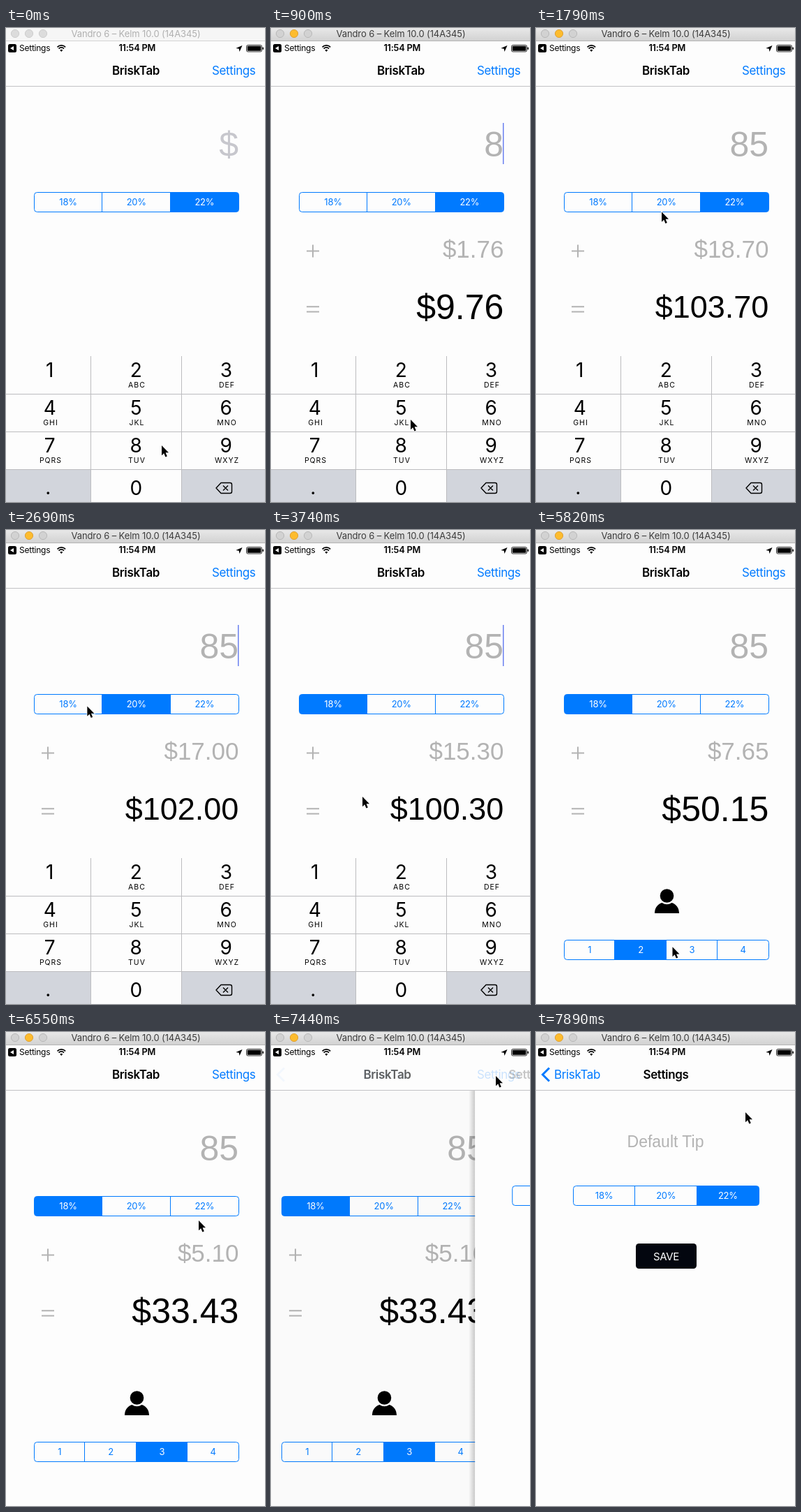
An HTML page that plays this animation: 371 by 679 pixels, repeating every 8 s.

```html
<!DOCTYPE html>
<html lang="en">
<head>
<meta charset="utf-8">
<title>Tip calculator</title>
<style>
html, body { margin: 0; width: 100%; height: 100%; overflow: hidden; background: #fdfdfd; }
svg { display: block; width: 371px; height: 679px; }
text { font-family: Inter, sans-serif; letter-spacing: -.02em; }
.num { font-family: "Liberation Sans", Arial, sans-serif; letter-spacing: 0; }
.key { letter-spacing: 1px; }
</style>
</head>
<body>
<svg id="stage" viewBox="0 0 371 679"></svg>
<script>
const LOOP = 8000, BLUE = '#007aff', GREY = '#b3b3b3', PAPER = '#fdfdfd', APP = 'BriskTab';
const stage = document.getElementById('stage');

const runs = [[0, 300, 2], [600, 1640, 8], [1790, 1790, 1], [2090, 2990, 7], [3140, 3740, 5],
  [4040, 4930, 7], [5230, 6260, 8], [6410, 7000, 5], [7290, 7890, 5]];
const ticks = runs.flatMap(([a, b, n]) =>
  Array.from({ length: n }, (_, i) => n > 1 ? Math.floor((a + (b - a) * i / (n - 1)) / 10) * 10 : a));

// Pointer path: time, x, y
const path = [[450, 223, 598], [750, 200, 561], [1050, 200, 561], [1640, 188, 309], [1790, 180, 263.5],
  [2090, 186, 253], [2390, 186, 251], [2840, 92, 253], [3140, 92, 253], [3740, 131, 382],
  [4340, 131, 382], [4930, 138, 592], [5230, 150, 598], [5520, 150, 598], [5900, 203, 597],
  [6260, 203, 597], [6550, 276, 270], [6850, 322, 63], [7590, 322, 63], [7890, 300, 115]];

function pointer(t) {
  const i = path.findIndex(p => p[0] > t);
  if (i === 0) return path[0].slice(1);
  if (i < 0) return path[path.length - 1].slice(1);
  const [a, x, y] = path[i - 1], [b, u, v] = path[i];
  const k = (t - a) / (b - a), e = k * k * (3 - 2 * k);
  return [x + (u - x) * e, y + (v - y) * e];
}

function spring(ms) {
  const k = Math.max(0, ms) * .01826;
  return 1 - (1 + k) * Math.exp(-k);
}

const text = (s, x, y, size, fill = '#000', anchor = 'middle', more = '') =>
  `<text x="${x}" y="${y}" font-size="${size}" fill="${fill}" text-anchor="${anchor}" ${more}>${s}</text>`;
const num = (s, x, y, size, fill, anchor = 'end') => text(s, x, y, size, fill, anchor, 'class="num"');
const rect = (x, y, w, h, fill, more = '') =>
  `<rect x="${x}" y="${y}" width="${w}" height="${h}" fill="${fill}" ${more}/>`;
const line = (d, stroke, w = 1, more = '') =>
  `<path d="${d}" fill="none" stroke="${stroke}" stroke-width="${w}" ${more}/>`;
const group = (s, x, y, opacity = 1) => `<g transform="translate(${x} ${y})" opacity="${opacity}">${s}</g>`;
const bold = 'font-weight="600"';

function segments(labels, on, x, y, w) {
  const n = labels.length, step = w / n;
  const edge = i => i === 0 ? x : i === n ? x + w : Math.floor(x - .8 + i * step) + .5;
  const left = edge(on), right = edge(on + 1);
  const l = on === 0 ? 4 : 0, r = on === n - 1 ? 4 : 0;
  let s = `<path fill="${BLUE}" d="M${left + l} ${y}H${right - r}q${r} 0 ${r} ${r}V${y + 28 - r}q0 ${r} ${-r} ${r}H${left + l}q${-l} 0 ${-l} ${-l}V${y + l}q0 ${-l} ${l} ${-l}Z"/>`;
  s += rect(x, y, w, 28, 'none', `rx="4" stroke="${BLUE}"`);
  labels.forEach((label, i) => {
    if (i) s += line(`M${edge(i)} ${y}v28`, BLUE);
    s += text(label, x - .3 + (i + .5) * step, y + 18.7, 13, i === on ? '#fff' : BLUE);
  });
  return s;
}

function windowBar(active) {
  let s = rect(0, 0, 371, 18, active ? 'url(#bar)' : '#f6f6f6') + rect(0, 18, 371, 1, active ? '#b4b4b4' : '#d4d4d4');
  [13, 33, 53].forEach((x, i) => {
    const lit = active && i === 1;
    s += `<circle cx="${x}" cy="8" r="5.6" fill="${lit ? '#fdbc2e' : active ? '#d2d2d2' : '#dcdcdc'}" stroke="${lit ? '#dea034' : active ? '#b8b8b8' : '#cdcdcd'}"/>`;
  });
  return s + text('Vandro 6 – Kelm 10.0 (14A345)', 186, 13, 13, active ? '#3c3c3c' : '#b0b0b0', 'middle', 'style="letter-spacing:-.1px"');
}

function statusBar() {
  return rect(3, 23, 12, 12, '#000', 'rx="2.5"') + '<path d="M11 26v6l-5-3z" fill="#fff"/>' +
    text('Settings', 19, 33, 12, '#000', 'start') +
    line('M73.5 27.3a8 8 0 0 1 11.6 0M75.6 29.6a5 5 0 0 1 7.4 0', '#000', 1.7) +
    '<path d="M79.3 34l-2-2.3a2.8 2.8 0 0 1 4 0z"/>' +
    text('11:54 PM', 187.7, 33.4, 12.8, '#000', 'middle', bold) +
    '<path d="M338.5 25l-4 9-.8-4.2-4.4-.8z"/>' +
    rect(344.5, 24.5, 22, 9.5, 'none', 'rx="2" stroke="#000" stroke-width=".8"') +
    rect(345.7, 25.7, 19.6, 7.1, '#000', 'rx=".8"') + rect(367.5, 27.5, 1.5, 3.5, '#000', 'rx=".7"');
}

function navBar(p, pressed) {
  const q = Math.pow(p, 1.2), fade = pressed ? .25 * (1 - p) : 1;
  let s = rect(0, 19, 371, 64, PAPER) + rect(0, 83, 371, 1, '#c2c2c5');
  s += group(text(APP, 186, 67, 17, '#000', 'middle', bold), -125 * q, 0, (1 - p) ** 2);
  s += text('Settings', 357.4, 67, 16.9, BLUE, 'end', `opacity="${fade}"`);
  if (p > 0) {
    s += group(text(APP, 26, 67, 17, BLUE, 'start'), 125 * (1 - q), 0, p * p);
    s += group(line('M19 51.5L9.5 61L19 70.5', BLUE, 3), 0, 0, p * p);
    s += group(text('Settings', 186, 67, 17, '#000', 'middle', bold), 237 * (1 - p), 0, p);
  }
  return s;
}

function keypad(pressed) {
  const letters = ['', 'ABC', 'DEF', 'GHI', 'JKL', 'MNO', 'PQRS', 'TUV', 'WXYZ'], cols = [62.5, 186, 315];
  let s = rect(0, 470, 371, 209, PAPER);
  if (pressed) s += rect(122, 525, 129, 53, '#d2d5dc');
  s += rect(0, 633, 121, 46, '#d2d5dc') + rect(252, 633, 119, 46, '#d2d5dc');
  s += line('M121.5 470V679M251.5 470V679M0 524.5H371M0 578.5H371M0 632.5H371', '#bcbcbf');
  letters.forEach((abc, i) => {
    const x = cols[i % 3], y = 500 + 54 * Math.floor(i / 3);
    s += text(i + 1, x, y, 28) + text(abc, x + 1.5, y + 15, 10.5, '#000', 'middle', 'class="key"');
  });
  return s + text('.', 60, 668, 28) + text('0', 186, 669, 28) +
    line('M308 651.5H321q2.5 0 2.5 2.5V664q0 2.5-2.5 2.5H308L301 659ZM311 655.5l7 7m0-7l-7 7', '#000', 1.4, 'stroke-linejoin="round"');
}

function home(t) {
  const bill = t < 300 ? 0 : t < 1050 ? 8 : 85;
  const rate = t < 2390 ? 2 : t < 2840 ? 1 : 0;
  const people = t < 5380 ? 1 : t < 5960 ? 2 : 3;
  const tip = bill * (18 + 2 * rate) / 100, money = v => '$' + (v / people).toFixed(2);
  let s = rect(0, 84, 371, 595, PAPER);
  s += num(bill || '$', 333, 184, 50, bill ? GREY : '#c7c7cd');
  const blink = t < 1790 || (t >= 2240 && t < 2840) || t >= 3290;
  if (t >= 300 && t < 4190 && blink) s += rect(332, 136, 1.5, 59, '#6a80f0');
  s += segments(['18%', '20%', '22%'], rate, 40.5, 235.5, 293);
  if (bill) {
    const total = money(bill + tip), size = total.length > 6 ? 45 : 50;
    s += line('M51 319.5H69M60 310.5V328.5M51 399.2H69M51 406.5H69', GREY, 2);
    s += num(money(tip), 333.5, 328.6, 35, GREY);
    s += num(total, 333.3, size > 45 ? 416.5 : 415, size, '#000');
  }
  s += '<circle cx="187.5" cy="524" r="9.8"/>' +
    '<path d="M170 549C170 541 174.5 535.7 180.5 534Q187.5 538.6 194.5 534C200.5 535.7 205 541 205 549Z"/>';
  s += segments([1, 2, 3, 4], people - 1, 40.5, 587.5, 293);
  const drop = 210 * spring(t - 4150);
  if (drop < 209) s += group(keypad(t >= 900 && t < 1190), 0, drop);
  return s;
}

function settings() {
  return rect(-9, 84, 9, 595, 'url(#shade)') + rect(0, 84, 371, 595, PAPER) +
    num('Default Tip', 185.5, 165, 23, GREY, 'middle') +
    segments(['18%', '20%', '22%'], 2, 53.5, 220.5, 266) +
    rect(143, 303, 87, 36, '#03060f', 'rx="4.5"') + text('SAVE', 186.5, 326.5, 15, '#fff');
}

const defs = `<defs>
<linearGradient id="bar" x2="0" y2="1"><stop stop-color="#e8e8e8"/><stop offset="1" stop-color="#d2d2d2"/></linearGradient>
<linearGradient id="shade"><stop stop-color="#000" stop-opacity="0"/><stop offset="1" stop-color="#000" stop-opacity=".2"/></linearGradient>
</defs>`;

function scene(t) {
  let p = spring(t - 7393);
  if (p > .98) p = 1;
  let s = defs + group(home(t), -118 * p, 0);
  if (p > 0) s += rect(0, 84, 371, 595, '#000', `opacity="${.06 * p}"`) + group(settings(), 371 * (1 - p), 0);
  s += navBar(p, t >= 7290) + statusBar() + windowBar(t >= 300);
  const [x, y] = pointer(t);
  const arrow = '<path d="M0 0V14.2L3.2 11.2L5.4 16.4L7.8 15.4L5.6 10.3H10Z" stroke="#fff" stroke-width="1.6" paint-order="stroke"/>';
  return s + group(arrow, x, y);
}

let shown = -1;
function draw(now) {
  const t = now % LOOP, tick = ticks.filter(k => k <= t).pop() || 0;
  if (tick !== shown) stage.innerHTML = scene(shown = tick);
  requestAnimationFrame(draw);
}
draw(0);
</script>
</body>
</html>
```
